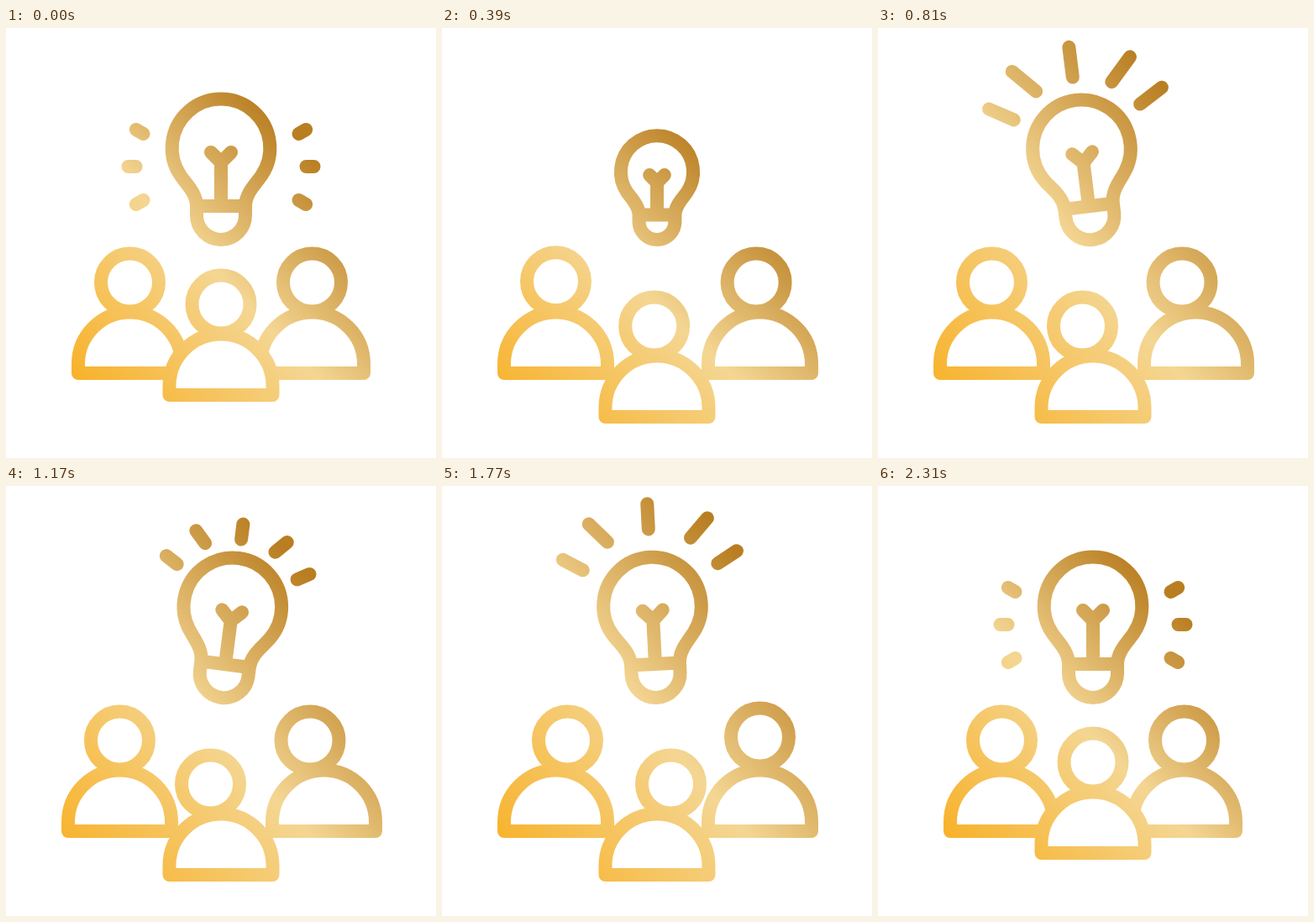
An HTML page with a canvas for the animation above (2.52 s loop, 512 px wide and 512 px high).

```html
<!DOCTYPE html>
<html lang="en">
<head>
<meta charset="utf-8">
<title>Team idea</title>
<style>
  html, body { margin: 0; width: 100%; height: 100%; overflow: hidden; background: #fff; }
  canvas { display: block; width: 512px; height: 512px; }
</style>
</head>
<body>
<canvas width="512" height="512"></canvas>
<script>
const ctx = document.querySelector('canvas').getContext('2d');
const LOOP = 2520, PIVOT_X = 256, PIVOT_Y = 252;

const bulb = new Path2D(
  'M227 212C227 197 215 186 208 176A58.3 58.3 0 1 1 304 176C297 186 285 197 285 212' +
  'M227 212V223A29 29 0 0 0 285 223V212Z' +
  'M256 212V160M244 148L256 160L268 148');
const torso = new Path2D('M-61.5 411V400A61.5 61.5 0 0 1 61.5 400V411Z');

// Inner and outer end of each ray, relative to the vertical axis
const topRays = [
  [-72, 101, -103.7, 82.3], [-42, 72, -70.7, 41.5], [0, 62, 0, 21],
  [42, 72, 70.7, 41.5], [72, 101, 103.7, 82.3]
];
const sideRays = [[92.5, 126, 101.2, 121], [101.5, 165, 110.5, 165], [92.5, 205, 101.2, 210]];

const gold = ctx.createLinearGradient(0, 1, 1, 0);
[[0, '#f8ae1f'], [.45, '#f4d693'], [.8, '#b97e22'], [1, '#b97e22']]
  .forEach(([at, color]) => gold.addColorStop(at, color));

const mix = (a, b, p) => a + (b - a) * p;

function smooth(x) {
  x = Math.min(1, Math.max(0, x));
  return x * x * (3 - 2 * x);
}

// Eased value from [time, value] keys
function track(t, ...keys) {
  let value = keys[0][1];
  for (let i = 1; i < keys.length; i++) {
    const [t0, v0] = keys[i - 1], [t1, v1] = keys[i];
    if (t >= t0) value = mix(v0, v1, smooth((t - t0) / (t1 - t0)));
  }
  return value;
}

function hop(t, start) {
  const p = (t - start) / 300;
  return p > 0 && p < 1 ? -4 * Math.sin(Math.PI * p) : 0;
}

function drawRay([x0, y0, x1, y1], from, to, matrix) {
  const end = p => new DOMPoint(PIVOT_X + mix(x0, x1, p), mix(y0, y1, p)).matrixTransform(matrix);
  const a = end(from), b = end(to);
  ctx.beginPath();
  ctx.moveTo(a.x, a.y);
  ctx.lineTo(b.x, b.y + .01);
  ctx.stroke();
  return Math.min(a.y, b.y) - 8;
}

function drawPerson(x, y, headX, headY) {
  ctx.save();
  ctx.translate(x, y);
  ctx.beginPath();
  ctx.arc(headX, 303 + headY, 34.5, 0, 7);
  ctx.stroke();
  ctx.globalCompositeOperation = 'destination-out';
  ctx.fill(torso);
  ctx.globalCompositeOperation = 'source-over';
  ctx.stroke(torso);
  ctx.restore();
}

function draw(t) {
  ctx.clearRect(0, 0, 512, 512);
  ctx.lineWidth = 16;
  ctx.lineCap = ctx.lineJoin = 'round';

  const spread = track(t, [0, 0], [330, 1], [1980, 1], [2310, 0]);
  const turn = (left, right) =>
    track(t, [300, 0], [570, left], [1230, left], [1500, right], [1980, right], [2310, 0]);
  const left = 147.5 - 12 * spread, right = 364.5 + 14 * spread, drop = 26 + 26 * spread;
  drawPerson(left, 0, turn(0, 14), hop(t, 360));
  drawPerson(right, 0, turn(-16.5, 0), hop(t, 1620));
  drawPerson(256, drop, turn(-12.5, 16.5), 0);

  // The outline scales while its line weight stays constant
  const size = track(t, [120, 1], [365, .68], [490, 1.21], [570, 1]);
  const angle = t > 565 && t < 1825 ? -7.4 * Math.sin((t - 565) / 420 * Math.PI) : 0;
  const tilt = new DOMMatrix().translate(PIVOT_X, PIVOT_Y).rotate(angle).translate(-PIVOT_X, -PIVOT_Y);
  const shape = new Path2D();
  shape.addPath(bulb, tilt.scale(size, size, 1, PIVOT_X, PIVOT_Y));
  ctx.stroke(shape);
  let top = PIVOT_Y - 168 * size - 8;

  const cycle = (t - 470) / 470;
  if (cycle > 0 && cycle < 3) {
    const p = cycle % 1;
    const from = smooth((p - .65) / .35), to = smooth((p - .33) / .35);
    if (to > 0) for (const ray of topRays) top = Math.min(top, drawRay(ray, from, to, tilt));
  }

  const reach = track(t, [0, 1], [180, 0], [2130, 0], [2310, 1]);
  if (reach > 0) {
    for (const [x0, y0, x1, y1] of sideRays) {
      drawRay([x0, y0, x1, y1], 0, reach);
      drawRay([-x0, y0, -x1, y1], 0, reach);
    }
  }

  // One gradient spans the bounds of the whole drawing
  const x = left - 69.5, width = right - left + 139;
  ctx.save();
  ctx.globalCompositeOperation = 'source-in';
  ctx.transform(width, 0, 0, 419 + drop - top, x, top);
  ctx.fillStyle = gold;
  ctx.fillRect(-1, -1, 3, 3);
  ctx.restore();
}

function frame() {
  draw(performance.now() % LOOP);
  requestAnimationFrame(frame);
}
frame();
</script>
</body>
</html>
```
